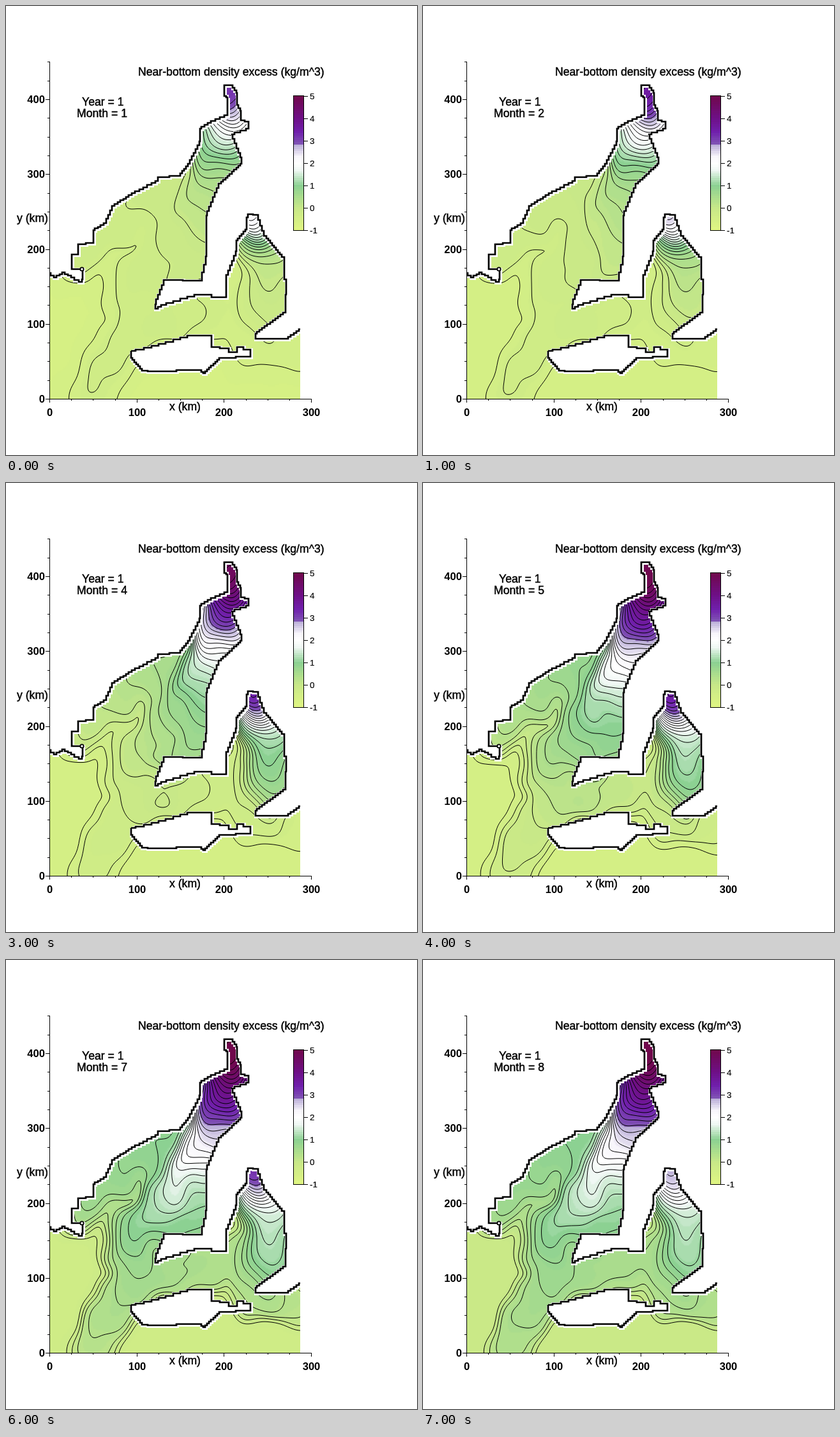
Animation of 644x703 px, one loop 8 s. Source, as an HTML page with a canvas:

```html
<!DOCTYPE html>
<html lang="en">
<head>
<meta charset="utf-8">
<title>Near-bottom density excess</title>
<style>
html, body { margin: 0; width: 644px; height: 703px; overflow: hidden; background: #fff; }
canvas, svg { position: absolute; left: 0; top: 0; display: block; }
text { font: 17.65px "Liberation Sans", Arial, sans-serif; stroke: #000; stroke-width: .45; }
.axis { font-weight: bold; font-size: 16.6px; stroke: none; }
.bar { font-size: 13.5px; stroke-width: .15; }
</style>
</head>
<body>
<canvas id="map" width="644" height="703"></canvas>
<svg id="chart" width="644" height="703" viewBox="0 0 644 703">
  <text x="207" y="109">Near-bottom density excess (kg/m^3)</text>
  <text x="119" y="156">Year = 1</text>
  <text x="111" y="174" id="month">Month = 1</text>
  <text x="17" y="338">y (km)</text>
  <text x="256" y="633">x (km)</text>
  <path id="ticks" fill="none" stroke="#000" shape-rendering="crispEdges"/>
</svg>
<script>
const $ = id => document.getElementById(id);
const svgNode = tag => document.createElementNS('http://www.w3.org/2000/svg', tag);
const points = s => s.trim().split(/\s+/).map(p => p.split(',').map(Number));
const mix = (a, b, t) => a + (b - a) * t;

// Key points of the shores, in stage pixels
const coast = points(`68,418 77,425 90,417 104,425 117,432 120,428 120,412 103,412 103,389 113,389
  113,373 137,371 137,351 155,340 168,313 199,293 237,274 239,268 272,266 286,247 304,212 304,192
  318,183 345,171 348,143 342,141 342,124 353,124 362,136 362,155 368,164 368,179 380,181 380,192
  353,201 369,237 369,247 335,278 313,328 314,392 306,430 248,429 233,467 235,474 246,468 300,452
  343,456 347,421 361,384 361,367 377,350 377,331 380,326 393,327 406,360 434,393 437,428 440,452
  436,480 391,513 391,521 440,521 461,506`);
const island = points(`196,540 222,535 290,516 322,516 322,534 348,536 349,542 361,542 362,534
  382,538 383,549 336,551 310,575 304,570 229,572 215,571 196,551 196,540`);

// Currents of dense water. start and peak give [amount, decay length, base] along the path,
// delay is the month of fastest change at its head, width runs from head to tail.
const currents = [
  { path: '350,128 358,172 338,208 346,245 318,290 282,318 272,350 255,380 205,418 190,437 207,470 205,510 165,545 130,615',
    start: [5, 90, -0.3], peak: [6.4, 200, 0.1], delay: 1.6, width: [24, 14] },
  { path: '255,275 215,300 165,340 110,396',
    start: [0.2, 80, -0.2], peak: [0.6, 150, 0.6], delay: 2.6, width: [22, 16] },
  { path: '312,330 304,380 296,415 245,440',
    start: [0.4, 40, -0.1], peak: [0.6, 60, 1], delay: 1.8, width: [16, 18] },
  { path: '386,328 400,352 420,388 416,430 408,480 400,500',
    start: [4, 32, -0.05], peak: [4, 45, 1.2], delay: 1.5, width: [16, 24], fade: 0.17 },
  { path: '225,500 290,485 350,462 374,490 398,533 461,542',
    start: [0.3, 80, -0.4], peak: [0.2, 80, 0.5], delay: 3.5, width: [18, 12] },
];

const MONTHS = 8, STEP = 2, X0 = 66, Y0 = 120, COLS = 200, ROWS = 250, GAP = 5;

// S-shaped growth from 0 in the first month to 1 in the last
function rise(m, delay) {
  const s = t => 1 / (1 + Math.exp(-1.3 * (t - delay)));
  return (s(m) - s(0)) / (s(MONTHS - 1) - s(0));
}
const openSea = m => mix(-0.55, -0.1, rise(m, 6));

function density(c, s, m) {
  const law = ([amount, decay, base], keep) => amount * keep * Math.exp(-s / decay) + base;
  const keep = 1 - (c.fade || 0) * Math.max(0, m - 5);
  return mix(law(c.start, 1), law(c.peak, keep), rise(m, c.delay + s / 170));
}

function sample(c) {
  const line = svgNode('path'), out = [];
  line.setAttribute('d', 'M' + c.path);
  const len = line.getTotalLength();
  for (let s = 0; s <= len; s += GAP) {
    const { x, y } = line.getPointAtLength(s);
    const values = Array.from({ length: MONTHS }, (_, m) => density(c, s, m));
    out.push({ x, y, values, w: mix(...c.width, s / len) });
  }
  return out;
}

// Seeded waves that bend the field into eddies
let seed = 11;
const rand = () => (seed = (seed * 16807) % 2147483647) / 2147483647;
const waves = Array.from({ length: 8 }, () => {
  const turn = rand() * 6.28, k = 6.28 / mix(45, 110, rand());
  return { kx: k * Math.cos(turn), ky: k * Math.sin(turn), phase: rand() * 6.28, push: rand() * 6.28 };
});
function bend(x, y) {
  let dx = 0, dy = 0;
  for (const w of waves) {
    const a = 2.8 * Math.sin(w.kx * x + w.ky * y + w.phase);
    dx += a * Math.cos(w.push);
    dy += a * Math.sin(w.push);
  }
  return [x + dx, y + dy];
}

function buildFields() {
  const samples = currents.flatMap(sample), sea = 0.1;
  const fields = Array.from({ length: MONTHS }, () => new Float32Array(COLS * ROWS));
  const ambient = fields.map((_, m) => openSea(m));
  for (let k = 0; k < COLS * ROWS; k++) {
    const [x, y] = bend(X0 + (k % COLS) * STEP, Y0 + Math.floor(k / COLS) * STEP);
    const sum = ambient.map(v => v * sea);
    let total = sea;
    for (const p of samples) {
      const q = ((x - p.x) ** 2 + (y - p.y) ** 2) / (2 * p.w * p.w);
      if (q > 9) continue;
      const w = GAP / (p.w * 2.5) * Math.exp(-q);
      total += w;
      for (let m = 0; m < MONTHS; m++) sum[m] += w * p.values[m];
    }
    for (let m = 0; m < MONTHS; m++) fields[m][k] = sum[m] / total;
  }
  return fields;
}

const ramp = [
  [-1, 224, 246, 130], [0, 200, 232, 136], [1, 140, 209, 146], [1.7, 240, 248, 244],
  [2, 255, 255, 255], [2.3, 248, 246, 251], [2.8, 190, 178, 218], [2.87, 128, 84, 180],
  [3.4, 112, 32, 172], [4, 110, 16, 136], [5, 112, 8, 76],
];
function color(v) {
  v = Math.min(5, Math.max(-1, Math.round(v * 10) / 10));
  let i = 1;
  while (i < ramp.length - 1 && ramp[i][0] < v) i++;
  const a = ramp[i - 1], b = ramp[i], t = (v - a[0]) / (b[0] - a[0]);
  return [1, 2, 3].map(c => mix(a[c], b[c], t));
}

// Grid-cell outline centred on the given line
function stairs(pts) {
  const path = new Path2D();
  let [x, y] = pts[0];
  path.moveTo(x, y);
  for (const [nx, ny] of pts.slice(1)) {
    const n = Math.max(1, Math.round(Math.min(Math.abs(nx - x), Math.abs(ny - y)) / 3));
    for (let i = 1; i <= n; i++) {
      const cx = Math.round(mix(x, nx, (i - 0.5) / n));
      path.lineTo(cx, Math.round(mix(y, ny, (i - 1) / n)));
      path.lineTo(cx, Math.round(mix(y, ny, i / n)));
    }
    path.lineTo(nx, ny);
    [x, y] = [nx, ny];
  }
  return path;
}
const coastPath = stairs(coast), islandPath = stairs(island);
const sea = stairs([...coast, [461, 615], [68, 615]]);

function contour(g, f, level) {
  for (let j = 0; j < ROWS - 1; j++) {
    for (let i = 0; i < COLS - 1; i++) {
      const k = j * COLS + i, a = f[k], b = f[k + 1], c = f[k + COLS + 1], d = f[k + COLS];
      const up = (a > level) + (b > level) + (c > level) + (d > level);
      if (up === 0 || up === 4) continue;
      const hits = [];
      const edge = (p, q, x, y, dx, dy) => {
        if (p > level === q > level) return;
        const t = (level - p) / (q - p);
        hits.push([X0 + (i + x + dx * t) * STEP, Y0 + (j + y + dy * t) * STEP]);
      };
      edge(a, b, 0, 0, 1, 0);
      edge(b, c, 1, 0, 0, 1);
      edge(d, c, 0, 1, 1, 0);
      edge(a, d, 0, 0, 0, 1);
      for (let h = 0; h + 1 < hits.length; h += 2) {
        g.moveTo(...hits[h]);
        g.lineTo(...hits[h + 1]);
      }
    }
  }
}

function canvas(w, h) {
  const c = document.createElement('canvas');
  c.width = w;
  c.height = h;
  return c;
}

function paint(field) {
  const tile = canvas(COLS, ROWS), tg = tile.getContext('2d');
  const img = tg.createImageData(COLS, ROWS);
  field.forEach((v, k) => img.data.set([...color(v), 255], k * 4));
  tg.putImageData(img, 0, 0);

  const page = canvas(644, 703), g = page.getContext('2d');
  g.save();
  g.clip(sea);
  g.drawImage(tile, X0 - 1, Y0 - 1, COLS * STEP, ROWS * STEP);
  g.beginPath();
  for (let v = -0.48; v < 5.2; v += 0.16) contour(g, field, v);
  g.stroke();
  g.restore();

  g.save();
  g.translate(1, 1);
  g.strokeStyle = '#fff';
  g.lineWidth = 6;
  g.stroke(coastPath);
  g.stroke(islandPath);
  g.restore();
  g.fillStyle = '#fff';
  g.fill(islandPath);
  g.lineWidth = 2.7;
  g.stroke(coastPath);
  g.stroke(islandPath);
  g.beginPath();
  g.arc(119, 412, 2.7, 0, 7);
  g.fill();
  g.lineWidth = 1.8;
  g.stroke();

  for (let y = 141; y < 351; y++) {
    g.fillStyle = `rgb(${color(5 - (y - 141) / 35).map(Math.round)})`;
    g.fillRect(450, y, 17, 1);
  }
  return page;
}

function label(x, y, str, cls, anchor) {
  const t = svgNode('text');
  const attrs = { x, y, class: cls, 'text-anchor': anchor };
  for (const key in attrs) t.setAttribute(key, attrs[key]);
  t.textContent = str;
  $('chart').append(t);
}

function drawAxes() {
  let d = 'M68.5 87V615.5H478.5M450.5 140.5H466.5V351.5H450.5Z';
  for (let km = 0; km <= 450; km += 25) {
    const major = km % 100 === 0, len = major ? 6 : 3;
    const x = Math.round(68 + km * 1.3667) + 0.5, y = Math.round(615 - km * 1.1725) + 0.5;
    d += `M68 ${y}h${-len}`;
    if (km <= 300) d += `M${x} 615v${len}`;
    if (!major) continue;
    label(61, y + 5.5, km, 'axis', 'end');
    if (km <= 300) label(x, 642, km, 'axis', 'middle');
  }
  for (let v = -1; v <= 5; v++) {
    const y = 316.5 - v * 35;
    d += `M467 ${y}h6`;
    label(476, y + 4.5, v, 'bar', 'start');
  }
  $('ticks').setAttribute('d', d);
}

drawAxes();
const pages = buildFields().map(paint);
const view = $('map').getContext('2d');
let shown = -1;

function show(ms) {
  const m = Math.floor(ms / 1000) % MONTHS;
  if (m === shown) return;
  shown = m;
  view.clearRect(0, 0, 644, 703);
  view.drawImage(pages[m], 0, 0);
  $('month').textContent = `Month = ${m + 1}`;
}

function tick(ms) {
  show(ms);
  requestAnimationFrame(tick);
}
show(0);
requestAnimationFrame(tick);
</script>
</body>
</html>
```
